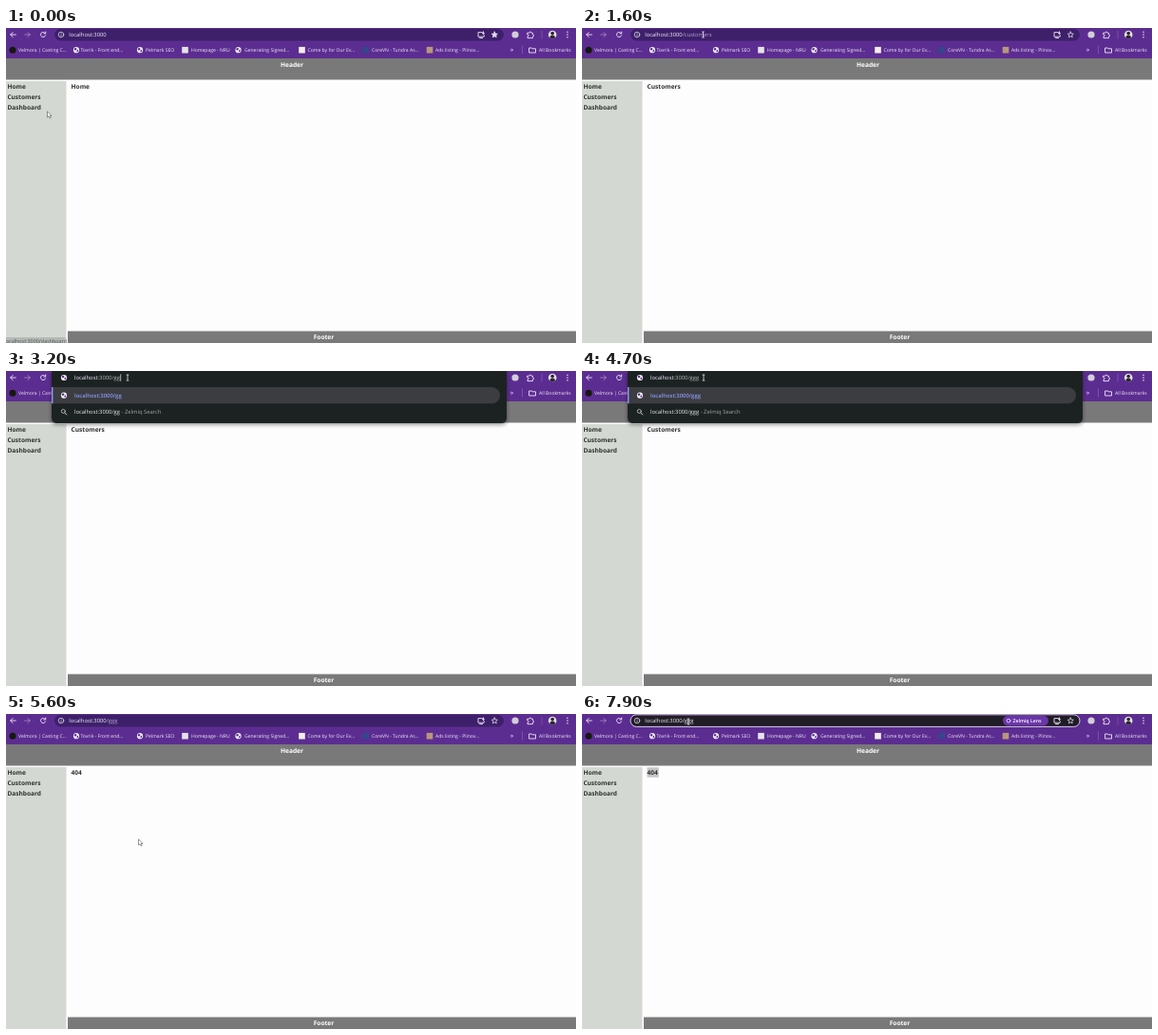
An HTML page for the animation above (8 s loop, 600 by 332 pixels).

```html
<!DOCTYPE html>
<html lang="en">
<head>
<meta charset="utf-8">
<title>Routing demo</title>
<style>
  html, body { margin: 0; width: 100%; height: 100%; overflow: hidden; background: #fdfdfd; }
  svg { display: block; width: 100vw; height: 100vh; }
  text { font-family: "Open Sans", "Noto Sans", sans-serif; text-rendering: geometricPrecision; white-space: pre; }
  .page { font-size: 6.55px; font-weight: 700; fill: #303030; }
  .bar { font-size: 6.6px; font-weight: 700; fill: #fff; text-anchor: middle; }
  .mark { font-size: 5.05px; fill: #f1eaf8; }
  .url { font-size: 5.85px; fill: #f4eefb; }
  .line { fill: none; stroke: #efe6f8; stroke-width: .9; stroke-linecap: round; stroke-linejoin: round; }
</style>
</head>
<body>
<svg viewBox="0 0 600 332">
  <defs>
    <filter id="shade" x="-5%" y="-20%" width="110%" height="150%">
      <feDropShadow dx="0" dy="1.5" stdDeviation="2" flood-color="#000" flood-opacity=".45"/>
    </filter>
    <g id="globe">
      <circle r="3.1" fill="#f1eaf8"/>
      <path d="M-2.2 -1.6L-.4 -2.3L.5 -1L-.8 .2L-2 .1ZM.6 .3L2.2 -.4L1.9 1.5L.6 2.2Z" fill="#4c2a78"/>
    </g>
  </defs>

  <!-- page -->
  <rect width="600" height="332" fill="#fdfdfd"/>
  <rect y="32" width="600" height="22.5" fill="#797979"/>
  <rect y="56" width="63.5" height="276" fill="#d3d9d2"/>
  <rect x="65" y="319.5" width="535" height="12.5" fill="#797979"/>
  <text class="bar" x="301" y="40.7">Header</text>
  <text class="bar" x="334.5" y="327.6">Footer</text>
  <g id="nav"></g>
  <rect id="picked" x="68.5" y="56.3" width="12.3" height="10.4"/>
  <text class="page" id="title" x="68.6" y="64.3"></text>
  <g id="status">
    <rect y="326" width="62.5" height="6" fill="#b4b9b6"/>
    <text id="statusText" x="-1.5" y="331.6" font-size="5.4" fill="#555"></text>
  </g>

  <!-- browser chrome -->
  <rect width="600" height="32" fill="#5c2d91"/>
  <path class="line" d="M10.3 7H4.8M7.2 4.5L4.7 7L7.2 9.5"/>
  <path class="line" d="M19.7 7H25.2M22.8 4.5L25.3 7L22.8 9.5" opacity=".45"/>
  <path class="line" d="M41.3 5.5A2.6 2.6 0 1 0 41.6 7.8M41.7 4V5.9H39.8"/>
  <circle cx="536" cy="7" r="3.6" fill="#d3cfd8"/>
  <path class="line" d="M549 5.2H550.8A1.1 1.1 0 0 1 553 5.2H554.4V6.8A1.1 1.1 0 0 1 554.4 9V10.6H549V9A1.1 1.1 0 0 0 549 6.8Z"/>
  <path d="M564 3V11.5M543.5 18.5V27.5" stroke="#8560b0" stroke-width=".7"/>
  <circle cx="575.2" cy="7" r="4.3" fill="#e4dfe3"/>
  <path d="M572.4 10.2Q572.5 7.6 575.2 7.6T578 10.2Q575.2 12.2 572.4 10.2Z" fill="#2c2430"/>
  <circle cx="575.2" cy="5.6" r="1.8" fill="#2c2430"/>
  <g fill="#f1eaf8"><circle cx="591" cy="4.3" r=".75"/><circle cx="591" cy="7" r=".75"/><circle cx="591" cy="9.7" r=".75"/></g>
  <g id="marks"></g>
  <text x="530.8" y="25.3" font-size="7" fill="#f1eaf8">»</text>
  <path class="line" d="M551 21H553.2L554 21.8H557.5V26H551Z" stroke-width=".7"/>
  <text class="mark" x="561" y="25">All Bookmarks</text>

  <!-- address bar -->
  <g id="address">
    <rect id="pill" x="51" y=".8" width="473" height="12.6" rx="6.3"/>
    <circle class="line" cx="58" cy="7" r="2.8" style="stroke-width:.7"/>
    <path d="M58 6.7V8.5M58 5.3V5.9" stroke="#efe6f8" stroke-width=".8"/>
    <g id="lens">
      <rect x="443" y="1.8" width="48" height="10.6" rx="5.3" fill="#6a36a8"/>
      <circle class="line" cx="449" cy="7.1" r="1.9" style="stroke-width:.8"/>
      <text x="453.5" y="8.9" font-size="5.2" font-weight="600" fill="#fff">Zelmiq Lens</text>
    </g>
    <path class="line" d="M501.3 4.6H497V9.2H503.2V7.6M498.6 10.6H501.6M502.5 3.8V6.4M501.4 5.5L502.5 6.5L503.6 5.5" stroke-width=".75"/>
    <path id="star" class="line" style="stroke-width:.75"/>
  </g>

  <g id="drop">
    <path d="M48 0H527V49Q527 55 521 55H54Q48 55 48 49Z" fill="#1f2023" filter="url(#shade)"/>
    <path d="M48 17H511.5A8.6 8.6 0 0 1 511.5 34.2H48Z" fill="#3c3d41"/>
    <rect x="48" y="17" width="1.4" height="17.2" fill="#8f9af0"/>
    <use href="#globe" x="61" y="7"/>
    <use href="#globe" x="61" y="25.7"/>
    <path class="line" d="M62 44.2L63.8 46" stroke="#c8c8cc"/>
    <circle class="line" cx="60.3" cy="42.4" r="2" style="stroke:#c8c8cc;stroke-width:.8"/>
    <text id="hint" x="72" y="28" font-size="5.9" font-weight="600" fill="#8c9af2"></text>
    <text x="72" y="45.2" font-size="5.85" fill="#eee"><tspan id="query"></tspan><tspan fill="#a3a4a8"> - Zelmiq Search</tspan></text>
  </g>

  <rect id="urlPick" y="2.8" height="8.4" fill="#4b74c9"/>
  <text class="url" y="9.2" id="url"><tspan id="host"></tspan><tspan id="path"></tspan></text>
  <rect id="caret" y="3.3" width=".6" height="7.5" fill="#fff"/>

  <path id="arrow" d="M0 0V6.2L1.5 4.9L2.6 7.1L3.7 6.6L2.7 4.5H4.6Z" fill="#fff" stroke="#333" stroke-width=".5"/>
  <path id="hand" d="M0 0Q.9 -.6 1.1 .5V2.8L3.9 3.4Q4.7 3.7 4.5 4.6L4 7H.7L-1.6 4.3Q-1.4 3.4 -.2 4.1V.5Z" fill="#fff" stroke="#333" stroke-width=".5"/>
  <path id="beam" d="M-1.3 -3H1.3M0 -3V3M-1.3 3H1.3" fill="none" stroke="#f2f2f2" stroke-width=".75"/>
</svg>

<script>
const LOOP = 8000, STEP = 100;
const $ = id => document.getElementById(id);

function add(parent, tag, attrs, text) {
  const el = document.createElementNS("http://www.w3.org/2000/svg", tag);
  for (const key in attrs) el.setAttribute(key, attrs[key]);
  if (text) el.textContent = text;
  $(parent).append(el);
}
const show = (id, on) => { $(id).style.display = on ? "" : "none"; };
const set = (id, attrs) => { for (const key in attrs) $(id).setAttribute(key, attrs[key]); };

["Home", "Customers", "Dashboard"].forEach((label, i) =>
  add("nav", "text", { class: "page", x: 1.4, y: 64.3 + i * 10.8 }, label));

// icon x, icon kind or colour, label x, label
[
  [7, "#17180f", 13, "Velmora | Casting C..."],
  [74, "globe", 78.4, "Tovrik - Front end..."],
  [141, "globe", 147, "Pelmark SEO"],
  [188.5, "#e6e3e8", 195, "Homepage - NRU"],
  [244.5, "globe", 251, "Generating Signed..."],
  [311.5, "#f1efe6", 317.5, "Come by for Our Ev..."],
  [378.5, "#35468c", 385, "CoreVN - Tundra As..."],
  [446, "#b8977e", 452, "Ads listing - Plinov..."]
].forEach(([x, icon, tx, label], i) => {
  if (icon === "globe") add("marks", "use", { href: "#globe", x, y: 23.2 });
  else if (i === 0) add("marks", "circle", { cx: x, cy: 23.2, r: 3.5, fill: icon });
  else add("marks", "rect", { x: x - 3.3, y: 19.9, width: 6.6, height: 6.6, fill: icon });
  add("marks", "text", { class: "mark", x: tx, y: 25 }, label);
});

const starPoints = Array.from({ length: 10 }, (_, i) => {
  const r = i % 2 ? 1.5 : 3.2, a = i * Math.PI / 5;
  return (514.3 + r * Math.sin(a)).toFixed(2) + " " + (7.2 - r * Math.cos(a)).toFixed(2);
});
set("star", { d: "M" + starPoints.join("L") + "Z" });

// Each entry overrides the state from its time on.
const states = [
  [0, { path: "", title: "Home", status: "/dashboard", mode: "idle", pick: "", urlPick: "", caret: false }],
  [500, { path: "/dashboard", title: "Dashboard" }],
  [900, { status: "/customers" }],
  [1100, { path: "/customers", title: "Customers" }],
  [1400, { status: "" }],
  [1900, { mode: "focus", urlPick: "all" }],
  [2300, { urlPick: "path" }],
  [2800, { mode: "drop", path: "/g", urlPick: "", caret: true }],
  [3000, { path: "/gg" }],
  [3600, { caret: false }],
  [4100, { path: "/ggg", caret: true }],
  [4600, { caret: false }],
  [5000, { mode: "idle", title: "404" }],
  [6500, { pick: "#5b50b3" }],
  [7600, { mode: "focus", pick: "#c6c6c6" }]
];

const pointer = [
  [0, 43.5, 88], [300, 31, 83], [700, 31, 83], [900, 29, 72], [1200, 29, 72],
  [1500, 127.5, 7], [1900, 127.5, 7], [2100, 128, 7], [5100, 128, 7], [5400, 134, 87],
  [5600, 139.5, 132], [5800, 137, 129], [6200, 84, 63], [6400, 83, 62], [6600, 68, 62],
  [6800, 70, 66], [7200, 113, -3.5], [7300, 113, -4.5], [7500, 112, 8], [8000, 112, 8]
];

function pointerAt(t) {
  const i = pointer.findIndex(p => p[0] > t);
  const [t0, x0, y0] = pointer[i - 1], [t1, x1, y1] = pointer[i];
  const k = (t - t0) / (t1 - t0);
  return [x0 + (x1 - x0) * k, y0 + (y1 - y0) * k];
}

function drawPointer(t) {
  const [x, y] = pointerAt(t);
  const overLink = x < 40 && y > 56 && y < 88;
  const overText = (y > 1 && y < 13) || (x > 67 && x < 85 && y > 56 && y < 67);
  const kind = overLink ? "hand" : overText ? "beam" : "arrow";
  for (const id of ["arrow", "hand", "beam"]) show(id, id === kind);
  set(kind, { transform: `translate(${x} ${y})` });
  if (kind === "beam") set("beam", { stroke: y > 30 ? "#333" : "#f2f2f2" });
}

function draw(t) {
  const s = Object.assign({}, ...states.filter(e => e[0] <= t).map(e => e[1]));
  const host = "localhost:3000", full = host + s.path;
  const drop = s.mode === "drop", focus = s.mode === "focus";

  $("title").textContent = s.title;
  show("picked", s.pick);
  set("picked", { fill: s.pick || "none" });
  $("title").style.fill = s.pick === "#5b50b3" ? "#fff" : "";

  show("status", s.status);
  $("statusText").textContent = host + s.status;

  set("pill", {
    fill: focus ? "#201d27" : "#3d2069",
    stroke: focus ? "#d9cdea" : "none", "stroke-width": 1
  });
  show("lens", focus);
  set("star", { style: `stroke-width:.75;fill:${s.path ? "none" : "#e3d5f5"}` });

  show("drop", drop);
  $("hint").textContent = $("query").textContent = full;

  const left = drop ? 72 : 66.3;
  set("url", { x: left });
  $("host").textContent = drop ? "localhost" : host;
  $("path").textContent = drop ? ":3000" + s.path : s.path;
  set("path", { fill: drop ? "#b9babd" : focus ? "#f4eefb" : "#b9a5d2" });

  const hostWidth = $("host").getComputedTextLength();
  const width = $("url").getComputedTextLength();
  const from = s.urlPick === "path" ? hostWidth + 2 : 0;
  show("urlPick", s.urlPick);
  set("urlPick", { x: left + from, width: Math.max(0, width - from) });
  show("caret", s.caret);
  set("caret", { x: left + width + .5 });

  drawPointer(t);
}

const start = performance.now();
function tick() {
  const t = (performance.now() - start) % LOOP;
  draw(Math.floor(t / STEP) * STEP);
  requestAnimationFrame(tick);
}
tick();
</script>
</body>
</html>
```
